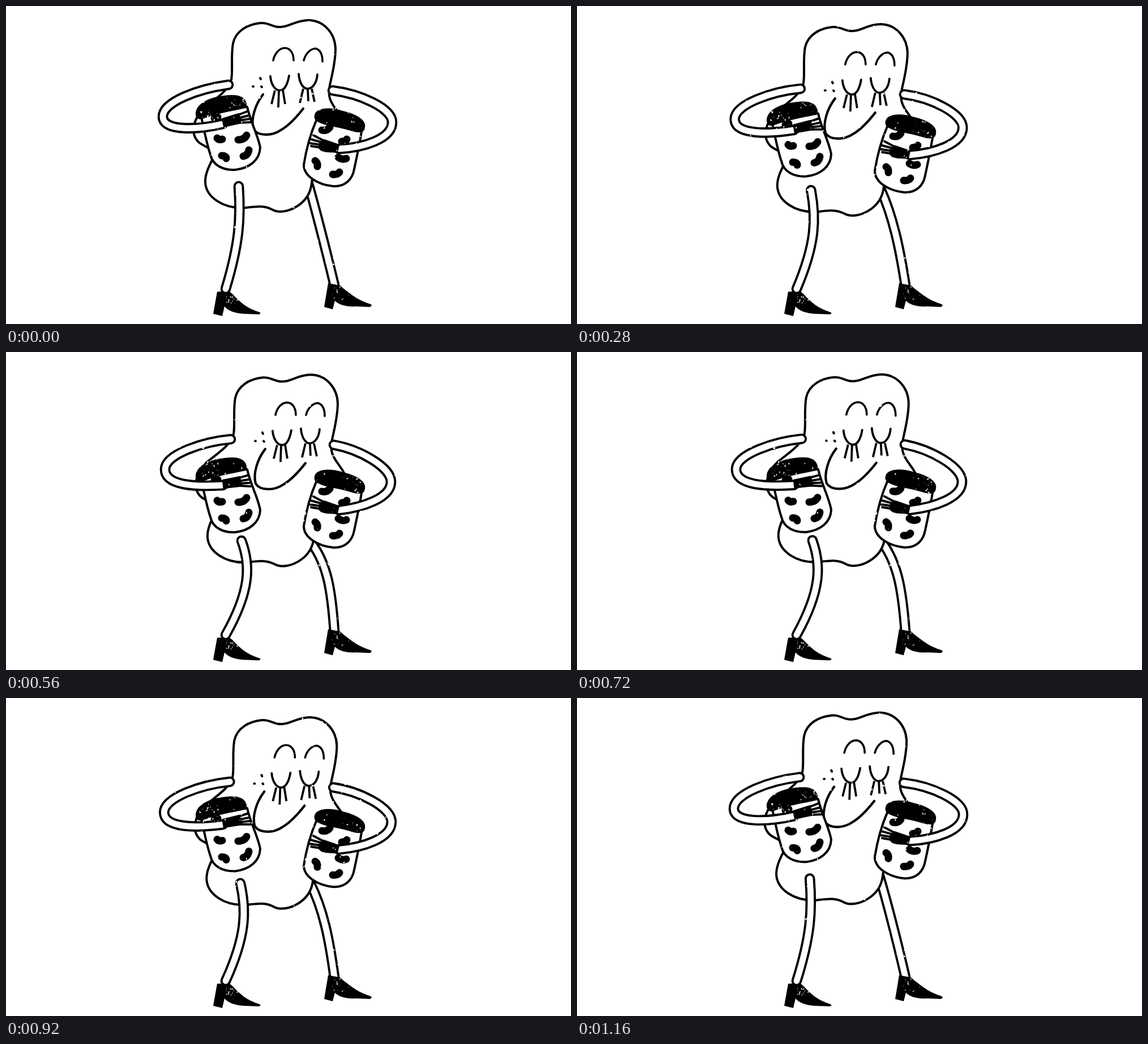
Recreate the animation shown at these times as an HTML page with a canvas. Size 998 by 561 pixels, loop 1240 ms.

```html
<!DOCTYPE html>
<html>
<head>
<meta charset="utf-8">
<style>
html, body { margin: 0; width: 100%; height: 100%; overflow: hidden; background: #fff; }
canvas { display: block; }
</style>
</head>
<body>
<canvas id="stage" width="998" height="561"></canvas>
<script>
const ctx = document.getElementById('stage').getContext('2d');
ctx.lineCap = ctx.lineJoin = 'round';

const body = `M485 37C470 38 466 29 450 30C428 32 406 43 401 66C397 88 401 112 398 130
  C392 150 372 162 350 180C330 200 325 225 340 240C352 250 368 250 366 268
  C360 280 351 296 352 312C354 337 383 358 422 356C440 354 455 351 470 359
  C482 366 500 362 513 354C528 345 538 332 540 312C541 290 560 270 585 240
  C605 220 600 205 584 184C572 168 568 158 572 140C576 120 582 100 582 75
  C581 48 562 26 535 25C512 25 500 37 485 37Z`;
const brows = 'M472 96C475 82 484 74 493 74C503 75 508 84 508 96M526 96C529 84 538 75 547 75C557 78 559 88 559 98';
const lids = 'M467 124C468 138 475 149 484 149C493 149 498 135 500 123M517 120C518 134 524 146 533 146C543 145 549 134 550 121';
const lashes = 'M475 149L469 173M482 150L481 179M489 148L493 173M525 146L519 171M533 147L534 168M540 146L545 169';
const nose = 'M454 156C440 174 432 200 437 217C445 230 470 230 487 218C502 209 514 195 525 181';
const freckles = 'M449 127l1 2M436 142h1M451 142l1 1';

const leftShoe = `M373 504L366 543L382 547L386 530C392 538 405 542 420 543L447 544Q452 541 447 540
  C430 534 418 528 400 508L394 503Z`;
const rightShoe = `M569 489L562 531L577 535L581 520C588 527 600 531 620 530L643 531Q648 528 644 526
  C625 520 612 512 590 493Z`;

const leftJar = {
  glass: 'M345 196C350 220 355 245 361 262C365 282 385 290 405 289C430 286 448 272 449 250C446 230 432 205 426 178',
  lid: 'M335 192C334 172 360 158 400 157C420 157 427 168 425 180C405 184 370 190 345 200Q336 200 335 192Z',
  beans: `M373 233Q376 237 382 235M410 236Q421 236 425 228M381 264Q389 264 389 269
    M419 265Q427 264 429 254M368 198Q372 200 374 196`
};
const rightJar = {
  glass: 'M548 202C538 225 530 255 526 280C526 300 550 315 578 318C600 319 612 305 615 288C620 265 625 240 628 222',
  lid: `M545 192C548 180 570 177 595 185C622 191 637 203 634 214C633 226 620 224 605 219
    C585 213 565 212 550 204Q543 200 545 192Z`,
  beans: `M558 219Q567 221 572 214M593 239Q600 239 602 235M587 267Q594 272 601 269
    M546 273Q551 276 550 283M577 297Q586 298 589 293`
};
const leftHand = {
  palm: 'M382 199L411 190L417 206L385 213Z',
  fingers: 'M408 193L426 186M410 198L429 193M412 202L431 199M410 206L432 205'
};
const rightHand = {
  palm: 'M588 245L562 236C552 240 549 250 558 255L566 257L585 258Z',
  fingers: 'M562 238L543 228M560 241L538 235M557 245L537 242M557 250L539 247'
};

// Limb curves, raised pose then lowered pose
const leftLeg = [[411, 318, 415, 375, 412, 420, 388, 499], [416, 333, 432, 375, 433, 420, 388, 499]];
const rightLeg = [[533, 310, 550, 370, 565, 430, 580, 492], [540, 338, 568, 375, 575, 420, 580, 492]];
const leftArm = [
  [393, 139, 340, 146, 277, 169, 277, 195, 277, 222, 340, 218, 383, 208],
  [397, 154, 350, 158, 281, 180, 281, 207, 281, 236, 335, 238, 383, 235]
];
const rightArm = [
  [577, 149, 625, 155, 682, 180, 682, 205, 682, 235, 630, 250, 588, 252],
  [579, 164, 625, 172, 680, 203, 680, 229, 680, 258, 630, 274, 588, 279]
];

function line(d, width = 4, color = '#000') {
  ctx.lineWidth = width;
  ctx.strokeStyle = color;
  ctx.stroke(new Path2D(d));
}

function fill(d, color = '#000') {
  ctx.fillStyle = color;
  ctx.fill(new Path2D(d));
}

function shifted(x, y, draw) {
  ctx.save();
  ctx.translate(x, y);
  draw();
  ctx.restore();
}

// The first point follows `start`, the others follow `rest`
function limb([up, down], start, rest) {
  const p = up.map((v, i) => v + (down[i] - v) * (i < 2 ? start : rest));
  const d = `M${p.slice(0, 2)}C${p.slice(2)}`;
  line(d, 18.6);
  line(d, 10.8, '#fff');
}

function jar({ glass, lid, beans }) {
  fill(glass, '#fff');
  line(glass);
  line(beans, 13);
  fill(lid);
}

function hand({ palm, fingers }) {
  fill(palm);
  line(palm, 2);
  line(fingers, 4);
}

let seed = 7;
const random = () => (seed = seed * 16807 % 2147483647) / 2147483647;

// Worn-print texture, fixed to the stage
const specks = new Path2D();
function scatter(count, x, y, w, h, size) {
  for (let i = 0; i < count; i++) {
    const cx = x + random() * w, cy = y + random() * h;
    const r = size * (0.3 + random() ** 2);
    const turn = random() * 3;
    specks.moveTo(cx + r, cy);
    specks.ellipse(cx, cy, r * 1.3, r * 0.7, turn, 0, 7);
  }
}
scatter(400, 262, 20, 435, 480, 1.5);
scatter(26, 340, 185, 40, 35, 1.2);
scatter(16, 395, 162, 28, 22, 1.2);
scatter(18, 595, 195, 37, 50, 1.2);
scatter(22, 386, 509, 24, 18, 1);
scatter(22, 576, 494, 30, 24, 1);

function draw(n) {
  const x = (n > 12 ? 24 - n : n) / 12;
  const sway = Math.sin(x * Math.PI / 2) ** 1.55;
  const s = Math.min(1, x * 1.07);
  const lift = s ** 3 * (s * (6 * s - 15) + 10);

  ctx.fillStyle = '#fff';
  ctx.fillRect(0, 0, 998, 561);

  limb(rightLeg, sway, sway);
  shifted(4 * sway, 15.3 * sway, () => {
    fill(body, '#fff');
    line(body);
    line(brows, 3.6);
    line(lids, 3.8);
    ctx.lineCap = 'butt';
    line(lashes, 3.8);
    ctx.lineCap = 'round';
    line(nose, 4.2);
    line(freckles, 4);
  });
  fill(leftShoe);
  limb(leftLeg, sway, sway);
  fill(rightShoe);

  shifted(0, 29 * lift, () => jar(leftJar));
  shifted(0, 27 * lift, () => jar(rightJar));
  limb(leftArm, sway, lift);
  limb(rightArm, sway, lift);
  shifted(383, 207 + 27 * lift, () => {
    ctx.rotate(0.1 * lift);
    ctx.translate(-383, -207);
    hand(leftHand);
  });
  shifted(0, 27 * lift, () => hand(rightHand));

  ctx.fillStyle = '#fff';
  ctx.fill(specks);
}

// 24 drawings over 31 ticks of 40 ms: every fifth tick repeats one
function play() {
  const tick = Math.floor(performance.now() % 1240 / 40);
  draw(tick - Math.floor(tick / 5) - (tick > 0 ? 1 : 0));
  requestAnimationFrame(play);
}
play();
</script>
</body>
</html>
```
